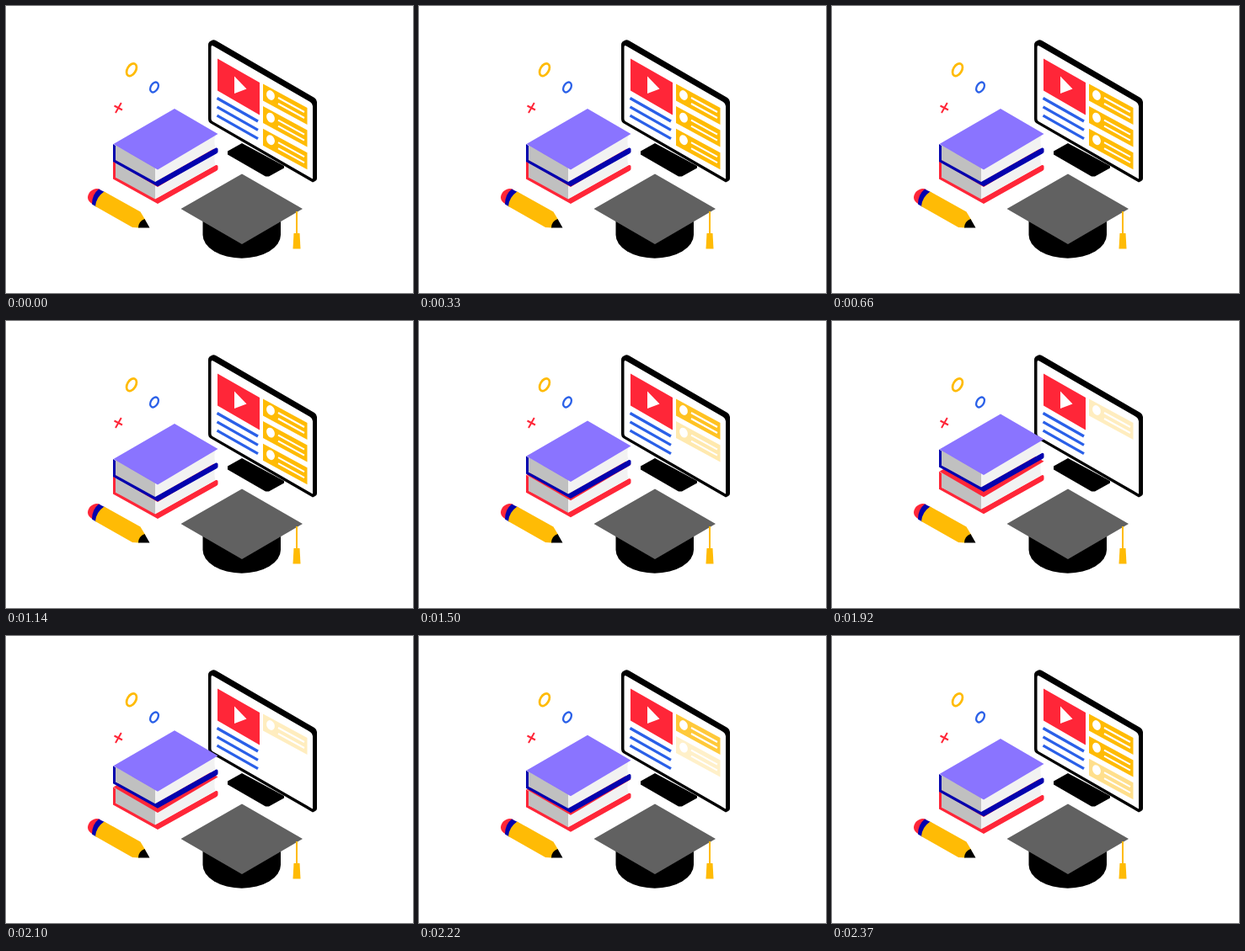
Recreate the animation shown at these times as an HTML page. Size 483 px wide and 341 px high, loop 2400 ms.

```html
<!DOCTYPE html>
<html lang="en">
<head>
<meta charset="utf-8">
<title>Online learning</title>
<style>
  html, body { margin: 0; width: 100%; height: 100%; overflow: hidden; background: #fff; }
  svg { display: block; width: 483px; height: 341px; }
  .red { fill: #ff2638; }
  .navy { fill: #0303ae; }
  .yellow { fill: #ffbb05; }
  .line { fill: none; stroke-width: 2; }
</style>
</head>
<body>
<svg viewBox="0 0 483 341">
  <defs>
    <g id="book">
      <path d="M127 164 L130 166 V183 L180 207 L249 168.500 Q251.500 168 251.500 170 V173 Q251.500 174.500 250 175.300 L180 214.500 L127 185 Z"/>
      <path d="M130 165 L177 192 V209 L130 183 Z" fill="#c0c0c0"/>
      <path d="M177 192 L249 151 Q246 160 248.500 168.500 L177 209 Z" fill="#f2f2f2"/>
    </g>
    <path id="cover" d="M200 122 L251.500 152 L180 194.500 L127.500 164 Z"/>
    <g id="card">
      <path class="yellow" d="M305 92.500 L357.500 121 V141 L305 112.500 Z"/>
      <ellipse cx="314" cy="106" rx="4.600" ry="6.200" transform="rotate(-25 314 106)" fill="#fff"/>
      <path class="line" d="M323 109 L354 126 M323 116 L354 133" stroke="#fff"/>
    </g>
  </defs>

  <!-- floating marks -->
  <ellipse class="line" cx="149" cy="75.700" rx="5" ry="8" transform="rotate(31 149 75.700)" stroke="#ffbb05" style="stroke-width:2.700"/>
  <ellipse class="line" cx="176" cy="96.500" rx="4.200" ry="6.500" transform="rotate(31 176 96.500)" stroke="#2a60e8" style="stroke-width:2.300"/>
  <path class="line" d="M128.500 118.500 L138 123.500 M136.800 115 L130 127" stroke="#ff2638"/>

  <!-- monitor -->
  <path d="M263 172.500 L280 163 L330 190 V192.500 L312 202.500 H308 L263 176.500 Z"/>
  <path d="M240 46 Q240 43 243 41.500 L245 40.500 Q247 40 249 41 L366 109 Q369 111 369 114 V205 Q369 207 367 208 L364 209.500 L243 139.500 Q240 138 240 134 Z"/>
  <path d="M243.500 49 Q243.500 46 246 47.500 L361 114 Q364 116 364 119 V205.500 L245 137 Q243.500 136 243.500 134 Z" fill="#fff"/>
  <path class="red" d="M251 62.500 L301 91 V129.500 L251 100.500 Z"/>
  <path d="M271 83.500 L285.500 98.500 L271 104 Z" fill="#fff"/>
  <g id="lines"></g>
  <g id="cards"></g>

  <!-- books -->
  <g id="lower">
    <g transform="translate(0 20.500)">
      <use href="#book" class="red"/>
      <use href="#cover" class="red"/>
    </g>
  </g>
  <g id="upper">
    <use href="#book" class="navy"/>
    <use href="#cover" fill="#8a74ff"/>
  </g>

  <!-- pencil -->
  <path class="red" d="M112 218 C105 214.500 97 221 97 227.500 Q97 232 103 235.500 Z"/>
  <path class="navy" d="M110 217.500 L118 221.500 L107 238.500 L102 235.500 Q102 224 110 217.500 Z"/>
  <path class="yellow" d="M116.500 220.500 L159.500 244.500 L165.500 254.500 L158 263.500 L150 263 L106 238 Q107 227 116.500 220.500 Z"/>
  <path d="M164.500 253 L170.500 263.500 L157 263.500 Q157 256 164.500 253 Z"/>

  <!-- graduation cap -->
  <path d="M233.500 248 V272 A46.200 27.700 0 0 0 326 272 V248 Z"/>
  <path d="M280 199.500 L352 241 L280 283 L207.500 241 Z" fill="#616161"/>
  <path class="line" d="M345 244 V272" stroke="#ffbb05"/>
  <path class="yellow" d="M341.500 270 H348.500 L349.500 288.500 H340.500 Z"/>
</svg>
<script>
const LOOP = 2400, STEP = 30, TURN = 1870;
const byId = id => document.getElementById(id);
const ramp = (x, from, to) => Math.min(1, Math.max(0, (x - from) / (to - from)));
const smooth = x => x * x * (3 - 2 * x);

byId('lines').innerHTML = [0, 1, 2].map(i =>
  `<path class="line" transform="translate(0 ${i * 10.3})" d="M250.500 109.500 L299 137" stroke="#2a60e8" style="stroke-width:3.200"/>`).join('');
byId('cards').innerHTML = [0, 1, 2].map(i =>
  `<use href="#card" y="${i * 26.6}"/>`).join('');

const cards = [...byId('cards').children];
// Fade start, fade end and lowest opacity, by distance from the turning point
const fades = [[185, 395, 0.25], [310, 500, 0], [475, 530, 0]];

function draw(now) {
  const time = Math.floor(now % LOOP / STEP) * STEP;
  const away = Math.abs(time - TURN);
  const lift = 11.6 * smooth(ramp(away, 500, 140));
  byId('upper').setAttribute('transform', `translate(0 ${-lift})`);
  byId('lower').setAttribute('transform', `translate(0 ${-lift / 2})`);
  cards.forEach((card, i) => {
    const [from, to, low] = fades[i];
    card.style.opacity = Math.max(low, ramp(away, from, to));
  });
}

const start = performance.now();
function tick() {
  draw(performance.now() - start);
  requestAnimationFrame(tick);
}
tick();
</script>
</body>
</html>
```
